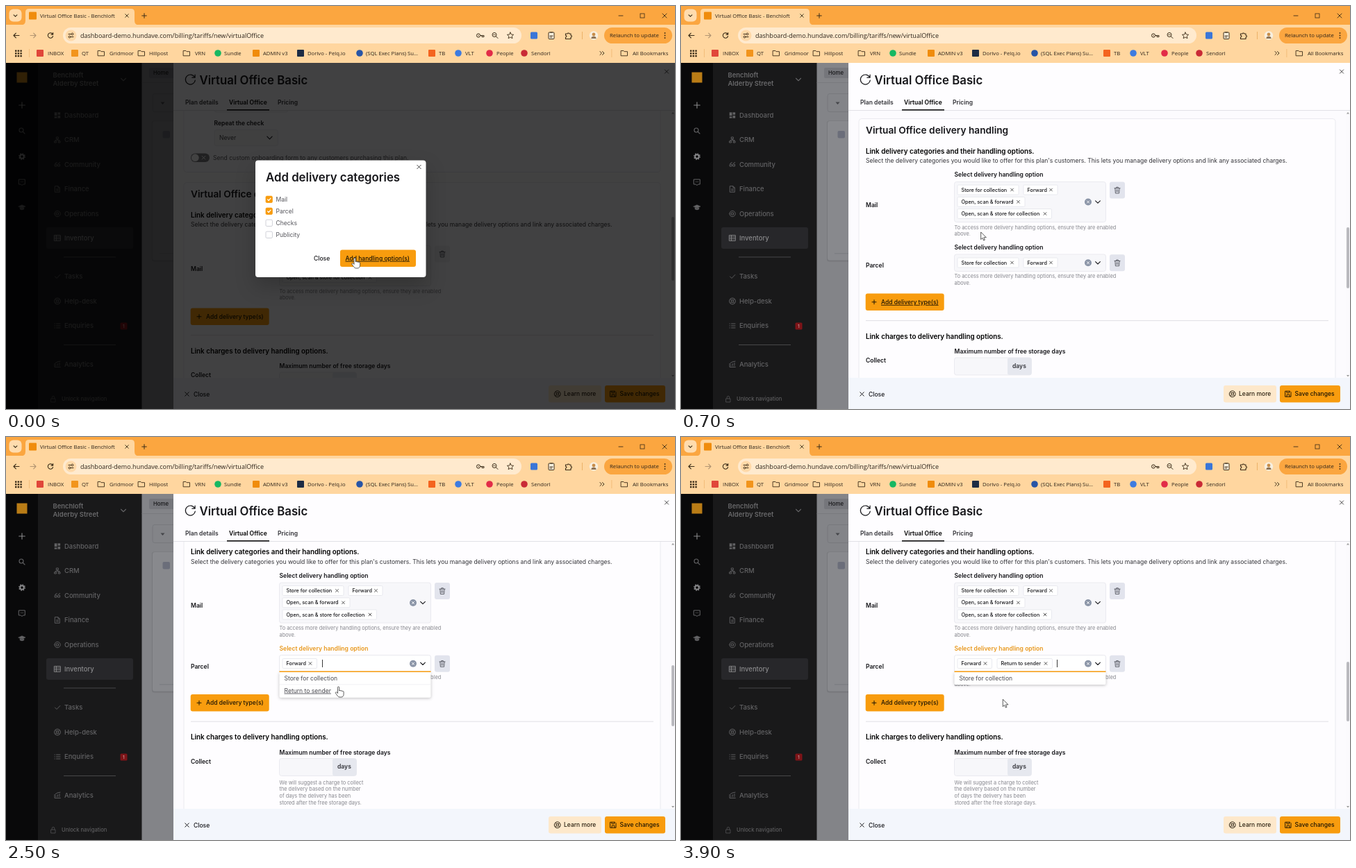
These frames come from a looping animation (963x581 px, 4 s). An HTML page:

```html
<!DOCTYPE html>
<html lang="en">
<head>
<meta charset="utf-8">
<title>Virtual Office Basic</title>
<style>
html, body { margin: 0; width: 100%; height: 100%; overflow: hidden; background: #fff; }
svg { display: block; width: 963px; height: 581px; }
text { font-family: Inter, "Liberation Sans", sans-serif; white-space: pre; }
text.ui { font-family: "Open Sans", "Noto Sans", sans-serif; }
</style>
</head>
<body>
<svg id="stage" viewBox="0 0 963 581"></svg>
<script>
const ORANGE = '#f89c0e', INK = '#17171b', GREY = '#85868c', LINE = '#e6e6ec';

// Drawing helpers: each returns SVG markup; text is placed by its vertical middle.
const text = (x, cy, s, size = 8.57, weight = 400, fill = INK, extra = '') =>
  `<text x="${x}" y="${cy + size * .36}" font-size="${size}" font-weight="${weight}" fill="${fill}" ${extra}>${s.replace(/&/g, '&amp;')}</text>`;
const ui = (x, cy, s, size = 7.7, fill = '#2c241a') => text(x, cy, s, size, 400, fill, 'class="ui"');
const rect = (x, y, w, h, fill, r = 0, stroke = 'none', sw = .8) =>
  `<rect x="${x}" y="${y}" width="${w}" height="${h}" rx="${r}" fill="${fill}" stroke="${stroke}" stroke-width="${sw}"/>`;
const dot = (x, y, r, fill, stroke = 'none', sw = 1) =>
  `<circle cx="${x}" cy="${y}" r="${r}" fill="${fill}" stroke="${stroke}" stroke-width="${sw}"/>`;
const path = (x, y, d, stroke = INK, sw = 1, fill = 'none') =>
  `<path transform="translate(${x} ${y})" d="${d}" fill="${fill}" stroke="${stroke}" stroke-width="${sw}" stroke-linecap="round" stroke-linejoin="round"/>`;
const cross = (x, y, s, c = INK, w = 1) => path(x, y, `M${-s} ${-s}L${s} ${s}M${s} ${-s}L${-s} ${s}`, c, w);
const plus = (x, y, s, c = INK, w = 1) => path(x, y, `M${-s} 0H${s}M0 ${-s}V${s}`, c, w);
const chevron = (x, y, s = 3.5, c = INK, w = 1.1) => path(x, y, `M${-s} ${-s / 2}L0 ${s / 2}L${s} ${-s / 2}`, c, w);
const group = (id, body) => `<g id="${id}">${body}</g>`;
const lens = (x, y, s, c, w = 1) => path(x, y, `M${s} ${s}L${s * .3} ${s * .3}`, c, w) + dot(x - s * .25, y - s * .25, s * .75, 'none', c, w);
const buoy = (x, y, c) => dot(x, y, 4.4, 'none', c) + dot(x, y, 1.8, 'none', c) +
  path(x, y, 'M-3-3L-1.3-1.3M3-3L1.3-1.3M-3 3L-1.3 1.3M3 3L1.3 1.3', c, 1);

function browser() {
  const c = '#3a2c18';
  const folder = x => path(x, 68, 'M-4.5-3.5H-1L0-2.3H4.5V3.8H-4.5Z', c, .9);
  const mark = (x, fill, round) => round ? dot(x, 68, 4.8, fill) : rect(x - 5, 63, 10, 10, fill, 1);
  const marks = [
    [49, '#e0463a', 0, 60, 'INBOX'], [99, '#f2941c', 0, 109, 'QT'], [137, '', 0, 149, 'Gridmoor'],
    [195, '', 0, 206, 'Hillpost'], [260, '', 0, 272, 'VRN'], [305, '#17b862', 1, 314, 'Sundle'],
    [360, '#f08c0c', 0, 370, 'ADMIN v3'], [424, '#1d2c44', 0, 434, 'Dorivo - Pelq.io'],
    [509, '#2855a6', 1, 518, '(SQL Exec Plans) Su...'], [613, '#f4641f', 0, 623, 'TB'],
    [651, '#3d7be0', 1, 661, 'VLT'], [696, '#e22c48', 1, 706, 'People'],
    [746, '#c92a36', 1, 756, 'Sendorl'], [890, '', 0, 902, 'All Bookmarks']
  ];
  let s = rect(0, 0, 963, 28, '#fba640') + rect(0, 27, 963, 55, '#ffd69f');
  s += path(0, 0, 'M22 27.5Q28 27 28 21V9Q28 4 33 4H180Q185 4 185 9V21Q185 27 191 27.5Z', 'none', 0, '#ffd69f');
  s += rect(4.5, 4.5, 18, 18, '#ffdcae', 6) + chevron(13.5, 14, 2.4, c);
  s += rect(33, 8.5, 11, 11, '#f08c0c', 1) + ui(49, 14, 'Virtual Office Basic - Benchloft');
  s += cross(174, 14, 2.3, c, .9) + plus(199, 14, 3.3, c);
  s += path(885, 14, 'M-3 0H3', c, .9) + rect(913, 11, 6, 6, 'none', 0, c) + cross(948, 14, 3, c, .9);
  s += path(15, 42.5, 'M4 0H-4M-.7-3.4L-4 0L-.7 3.4', c, 1.1) + path(39, 42.5, 'M-4 0H4M.7-3.4L4 0L.7 3.4', '#b29572', 1.1);
  s += path(64, 42.5, 'M3.4-1.6A3.7 3.7 0 1 0 3.6 1M3.7-4V-1.4H1', c, 1.1);
  s += rect(82, 31, 660, 23, '#ffeace', 11.5) + dot(93.5, 42.5, 8, '#ffd9a8');
  s += path(93.5, 42.5, 'M-3.5-2H0M-.5 2H3.5', c, 1) + dot(95.5, 40.5, 1.4, 'none', c) + dot(91.5, 44.5, 1.4, 'none', c);
  s += ui(107, 42.5, 'dashboard-demo.hundave.com/billing/tariffs/new/virtualOffice', 9.02);
  s += dot(680, 42.5, 2.6, 'none', c) + dot(680, 42.5, .7, c) + path(685, 42.5, 'M-2 0H3V2H0V0', c, 1);
  s += lens(704, 42.5, 4, c) + path(704, 42.5, 'M-2.6-1H.5', c, .7);
  s += path(726, 42.5, 'M0-4.5L1.4-1.5L4.6-1.2L2.2 1L2.9 4.2L0 2.5L-2.9 4.2L-2.2 1L-4.6-1.2L-1.4-1.5Z', c, .9);
  s += rect(755, 37.5, 10, 10, '#3a76d8', 1.5);
  s += rect(781, 38, 8, 9.5, '#fff3e0', 1, c, 1) + path(785, 43, 'M-2 0H2M-2 2H1M-1.5-5H1.5', c, 1);
  s += path(809.5, 43, 'M-4-3H-1.4A1.5 1.5 0 0 1 1.4-3H3.5V-.8A1.4 1.4 0 0 1 3.5 2V4.5H-4V2A1.4 1.4 0 0 0-4-.8Z', c, 1.1);
  s += rect(829, 37, .8, 11, '#e8a95c') + dot(846, 42.5, 6.2, '#f7efe0') + dot(846, 41, 2.4, '#c98e4a') + path(846, 47, 'M-3.6 0A3.6 3.2 0 0 1 3.6 0Z', 'none', 0, '#8d7355');
  s += rect(861, 31, 98, 23, '#fba640', 11.5) + ui(869, 42.5, 'Relaunch to update', 7.8);
  for (const y of [39, 42.5, 46]) s += dot(948.5, y, .9, c);
  for (let i = 0; i < 9; i++) s += rect(13 + i % 3 * 3.7, 63.5 + Math.floor(i / 3) * 3.7, 2.4, 2.4, c);
  s += rect(33, 62, .8, 12, '#efb671') + rect(871.5, 62, .8, 12, '#efb671');
  s += path(858, 68, 'M-3-2.5L-.5 0L-3 2.5M.5-2.5L3 0L.5 2.5', c, 1);
  for (const [x, fill, round, tx, label] of marks) s += (fill ? mark(x, fill, round) : folder(x)) + ui(tx, 68, label);
  return s;
}

function sidebar() {
  const c = '#636365', hi = '#8a8a8c';
  const icons = {
    Dashboard: [157.5, 'M-4-4H-.7V.5H-4ZM.7-4H4V-1H.7ZM.7.7H4V4H.7ZM-4 2H-.7V4H-4Z', 1],
    CRM: [193, 'M-1.3-4H1.3V-1.5H-1.3ZM-4 1.8H-1.6V4H-4ZM1.6 1.8H4V4H1.6ZM0-1.5V.3M-2.8 1.8V.3H2.8V1.8'],
    Community: [228.5, 'M-.8-3Q-4-2.5-4 2.5H-1V-.3H-2.6M3.6-3Q.5-2.5 .5 2.5H3.5V-.3H2'],
    Finance: [264, 'M-3.3-4.3H1L3.3-2V4.3H-3.3ZM1-4V-2H3M-1.5 0H1.5M-1.5 2H1.5'],
    Operations: [299.5, 'M-4.2 0A4.2 4.2 0 1 0 4.2 0A4.2 4.2 0 1 0-4.2 0M-1.5-1.5H1.5V1.5H-1.5Z'],
    Inventory: [334.5, 'M-4.3-4H4.3V4H-4.3ZM-4.3-1.5H4.3M-4.3 1.2H4.3M-1.6-4V4'],
    Tasks: [390, 'M-3.5 0L-1 2.5L3.8-2.5'],
    'Help-desk': [425.5, ''],
    Enquiries: [461, 'M-1.5-3H4M-1.5 0H4M-1.5 3H4M-4-3H-3.6M-4 0H-3.6M-4 3H-3.6'],
    Analytics: [516.5, 'M-4-1V4H4.3M-2 2V.5M.5 2V-.7M3 2V-2M-3-1.5L0-3.5L4-4.3']
  };
  let s = rect(0, 82, 46, 499, '#09090a') + rect(46, 82, 150, 499, '#19191a');
  s += rect(15.5, 95.5, 15, 15, '#b97c16');
  s += plus(23, 143, 4.3, hi, 1.1) + lens(23, 180, 4, c, 1.1);
  s += dot(23, 217, 2.8, 'none', hi, 1.9) + dot(23, 217, 4.3, 'none', hi, 1.2).replace('/>', ' stroke-dasharray="1.7 1.68"/>');
  s += path(23, 254, 'M-4.3-4H4.3V3H1.5L0 4.7L-1.5 3H-4.3ZM-1.5-.5H-1M1-.5H1.5', c, 1);
  s += path(23, 290, 'M-5-1L0-3.2L5-1L0 1.2ZM-2.8.8V3Q0 4.6 2.8 3V.8L0 2Z', c, .6, c);
  s += text(67.5, 100, 'Benchloft', 9.45, 600, '#68686a') + text(67.5, 112, 'Alderby Street', 9.45, 600, '#68686a') + chevron(169, 106, 3.5, c);
  s += rect(58, 319, 125, 31, '#27272a', 3);
  for (const [name, [y, d, solid]] of Object.entries(icons)) {
    const col = name === 'Inventory' ? hi : c;
    s += d ? path(74, y, d, col, solid ? .3 : .9, solid ? col : 'none') : buoy(74, y, col);
    s += text(84, y, name, 9.45, 500, col);
  }
  s += rect(83, 361.5, 75, .9, '#4d4d4f') + rect(83, 488, 75, .9, '#4d4d4f');
  s += rect(164.5, 456.5, 10, 10, '#7d1418', 1.5) + text(168, 461.5, '1', 6.5, 500, '#c9a0a0');
  s += path(68, 567, 'M-3-1H3V4H-3ZM-1.8-1V-2.8A1.8 1.8 0 0 1 1.8-2.8V-1', '#4c4c4e', .9) + text(80, 566, 'Unlock navigation', 7.65, 500, '#5c5c5e');
  s += rect(195.5, 82, 46, 499, '#838488') + rect(195.5, 110, 46, .8, '#77787c');
  s += rect(206, 89, 40, 15, '#75767b', 2) + text(212, 96.5, 'Home', 7.8, 500, '#151517');
  s += rect(211, 126.5, 40, 26, '#838488', 3, '#74757a') + path(225.5, 140, 'M-3-1.5H3L0 2Z', 'none', 0, '#45464a');
  s += rect(210, 165.5, 40, 203, '#77787c', 3) + rect(211, 166, 40, 200.5, '#88898d', 3) + rect(225.5, 180, 10.5, 10.5, '#6b6e7a', 2) + rect(221, 356.5, 20, .8, '#75767a');
  return s;
}

const chip = (x, cy, w, label) => rect(x, cy - 7, w, 14, '#fff', 1.5, '#e4e5eb') +
  text(x + 5.5, cy, label, 7.25, 500) + cross(x + w - 9.5, cy, 1.9, '#444', .9);
const tail = cy => dot(586, cy, 5, '#8b95a7') + cross(586, cy, 1.6, '#fff', .9) + chevron(600, cy, 3.4);
const trash = (cy, id) => `<rect id="${id}" x="617" y="${cy - 12}" width="22" height="24" rx="3" fill="#e2e4ed"/>` +
  path(628, cy, 'M-4-2.8H4M-1.3-2.8V-4.3H1.3V-2.8M-3.2-2.8L-2.6 4.5H2.6L3.2-2.8M-1-.8V2.5M1-.8V2.5', '#4d5058', .85);
const hint = (cy, lines, step = 9.8) => lines.map((l, i) => text(393.5, cy + i * step, l, 7.36, 400, GREY)).join('');
const access = ['To access more delivery handling options, ensure they are enabled', 'above.'];
const button = (x, y, w, fill) => rect(x, y, w, 24.5, fill, 3);
const caret = x => rect(x, 456.5, .9, 11, '#222');

function content() {
  let s = rect(241, 82, 722, 499, '#fcfbfe');
  let top = rect(256, 100, 686, 139.5, '#fefdff', 4, LINE) + rect(300, 130, 106, 23, '#f7f7fa', 3, LINE);
  top += text(299.5, 168.5, 'Repeat the check', 8.57, 600) + rect(300, 178.5, 91.5, 23, '#f7f7fa', 3, LINE) + text(307, 190, 'Never', 8.57, 400, '#444') + chevron(379.5, 190, 3.6);
  top += rect(266, 212.5, 27, 12.5, '#7b7b80', 6.2) + dot(272.3, 218.7, 5.4, '#fff') + cross(284.5, 218.7, 2.4, '#fff', 1);
  top += text(298, 219, 'Send custom onboarding form to any customers purchasing this plan.', 8.57, 400, '#55555b');
  top += rect(256, 254.5, 686, 600, '#fefdff', 4, LINE) + text(266, 271.5, 'Virtual Office delivery handling', 13.7, 600);
  top += text(266, 301, 'Link delivery categories and their handling options.', 9.82, 600, '#000');
  top += text(266, 315, "Select the delivery categories you would like to offer for this plan's customers. This lets you manage delivery options and link any associated charges.", 8.57, 400, '#333338');
  top += text(393.5, 335, 'Select delivery handling option', 8.57, 600) + rect(393.5, 345.5, 218, 58, '#f7f7fa', 3, LINE);
  top += chip(398, 357, 88, 'Store for collection') + chip(493, 357, 49, 'Forward') + chip(398, 374.3, 97, 'Open, scan & forward') + chip(398, 391.5, 135.5, 'Open, scan & store for collection');
  top += tail(374.5) + trash(357.5, 'bin') + hint(411, access) + text(266, 378.5, 'Mail', 8.57, 600);

  let parcel = text(393.5, 440.3, 'Select delivery handling option', 8.57, 600, INK, 'id="label"') + text(266, 466, 'Parcel', 8.57, 600);
  parcel += rect(393.5, 450, 218, 24.5, '#f7f7fa', 3, LINE) + hint(481.8, access) + trash(462.3, 'bin2');
  parcel += group('idle', chip(398, 462, 88, 'Store for collection') + chip(493, 462, 49, 'Forward'));

  let lower = button(265.7, 506.5, 113, ORANGE) + plus(278, 518.8, 3, '#1c1404', 1) + text(288, 518.8, 'Add delivery type(s)', 8.5, 500, '#1c1404', 'id="add"');
  lower += rect(266, 545.2, 666, .9, '#dcdce2') + text(266, 568, 'Link charges to delivery handling options.', 9.82, 600, '#000');
  lower += text(266, 603.3, 'Collect', 8.57, 600) + text(393.5, 590, 'Maximum number of free storage days', 8.57, 600);
  lower += rect(393.5, 599, 111, 25, '#f7f7fa', 3, LINE) + rect(470, 599, 34.5, 25, '#e6e8ef', 3) + text(477, 610.7, 'days', 8.57, 600, '#33343a');
  lower += hint(633.5, ['We will suggest a charge to collect', 'the delivery based on the number', 'of days the delivery has been', 'stored after the free storage days.']);

  const field = rect(393.5, 450, 218, 24.5, '#fff', 3, LINE) + chip(398, 462, 49.5, 'Forward');
  const menu = h => `<rect x="393.5" y="474.5" width="218" height="${h}" rx="2" fill="#fff" style="filter:drop-shadow(0 1.5px 2px rgba(0,0,0,.25))"/>` +
    rect(393.5, 473, 218, 1.5, ORANGE) + text(400.5, 483.5, 'Store for collection', 8.57, 400, '#4a4a50');
  const open = field + group('two', menu(36.8) + rect(394, 492, 217, .7, '#ececf0') + caret(455) + text(400.5, 501, 'Return to sender', 8.57, 400, '#4a4a50', 'text-decoration="underline"')) +
    group('one', menu(18) + chip(455, 462, 79.5, 'Return to sender') + caret(541));

  s += group('scroll', top + group('lower', lower) + group('parcel', parcel + group('open', open) + tail(462.3)));
  return s;
}

function frame() {
  let s = rect(241, 82, 722, 68.5, '#fefdff') + rect(241, 150, 722, .9, '#dedee4') + cross(951, 94.5, 2.6, '#333', .9);
  s += path(265.3, 106, 'M6.3-3.2A7 7 0 1 0 7 1M6.8-7V-2.8H2.6', INK, 1.2) + text(278.5, 106.5, 'Virtual Office Basic', 16.8, 600);
  s += text(258, 138.5, 'Plan details', 8.57, 600, '#333338') + text(321, 138.5, 'Virtual Office', 8.57, 600, '#000') + text(391, 138.5, 'Pricing', 8.57, 600, '#333338') + rect(318, 149, 61, 1.6, '#111');
  s += rect(957, 151, 6, 385, '#fbfafd') + path(960, 154.5, 'M-2 1L0-1.5L2 1Z', 'none', 0, '#999') + path(960, 533, 'M-2-1L0 1.5L2-1Z', 'none', 0, '#999');
  s += '<rect id="thumb" x="958" width="4" rx="2" fill="#b9b9be"/>';
  s += rect(241, 536, 722, 45, '#f3f6fc') + cross(260.5, 559.5, 2.7, INK, 1) + text(270, 559.5, 'Close', 8.57, 500);
  s += button(781, 547, 76, '#fde8cb') + buoy(793.7, 559.3, '#2a2010') + text(803, 559.3, 'Learn more', 8.5, 500, '#2a2010');
  s += button(862, 547, 87, ORANGE) + path(874, 559.3, 'M-4-4H2.5L4-2.5V4H-4ZM-2-4V-1.5H1.5V-4M-2 4V1H2V4', '#1c1404', .9) + text(883.5, 559.3, 'Save changes', 8.5, 500, '#1c1404');
  return s;
}

function modal() {
  let s = rect(0, 82, 963, 499, 'rgba(0,0,0,.74)');
  s += '<rect x="359" y="222.5" width="245.5" height="168.5" rx="4" fill="#fff" style="filter:drop-shadow(0 13px 14px rgba(0,0,0,.2))"/>';
  s += text(374, 247, 'Add delivery categories', 16.8, 600) + cross(594.5, 232, 2.7, '#333', .9);
  ['Mail', 'Parcel', 'Checks', 'Publicity'].forEach((name, i) => {
    const y = 278.8 + i * 17, on = i < 2;
    s += rect(374, y - 4.7, 9.4, 9.4, on ? ORANGE : '#fff', 1.5, on ? ORANGE : '#c4c6ce');
    if (on) s += path(378.7, y, 'M-2.2 0L-.6 1.7L2.3-1.6', '#fff', 1.2);
    s += text(388.5, y, name, 8.57, 400, '#55555b');
  });
  s += text(443, 364, 'Close', 8.57, 500) + button(481, 351.5, 109, ORANGE) + text(488.5, 363.7, 'Add handling option(s)', 8.5, 500, '#1c1404', 'text-decoration="underline"');
  return s;
}

const cursor = group('cursor',
  group('arrow', path(0, 0, 'M0 0V10.2L2.4 8L4 11.6L5.7 10.9L4.2 7.4H7.3Z', '#333', .8, '#fff')) +
  group('hand', path(0, 0, 'M-1.2 1.2a1.2 1.2 0 0 1 2.4 0V6c.3-1 2.2-.9 2.3.3.4-.9 2.1-.7 2.2.4.6-.7 1.9-.3 1.9.8v3.2c0 2.3-1.2 4.3-3.4 4.3H1.5C-.6 15-1.6 12.5-4 9.4c-.8-1.2.8-2.2 1.7-1.3l1.1 1.1z', '#333', .8, '#fff')));

// The scrolled content runs under the drawer frame and the browser bars.
document.getElementById('stage').innerHTML = sidebar() + content() + frame() + browser() + group('modal', modal()) + cursor;

const $ = id => document.getElementById(id);
const show = (id, on) => $(id).setAttribute('display', on ? 'inline' : 'none');
const move = (id, x, y) => $(id).setAttribute('transform', `translate(${x} ${y})`);

// Linear interpolation through [time, ...values] rows.
function along(keys, t) {
  const i = keys.findIndex(k => k[0] > t);
  if (i < 0) return keys[keys.length - 1].slice(1);
  if (i === 0) return keys[0].slice(1);
  const a = keys[i - 1], b = keys[i], p = (t - a[0]) / (b[0] - a[0]);
  return a.slice(1).map((v, j) => v + (b[j + 1] - v) * p);
}

const LOOP = 4000, STEP = 100, REMOVE = 2100, PICK = 3600;
const scrollKeys = [[300, 0], [400, 8], [500, 33], [600, 62], [700, 92], [800, 118], [900, 131], [1000, 135.5]];
const pointerKeys = [[0, 502, 363], [100, 483, 357], [300, 443, 336], [500, 423, 325], [800, 436, 327], [1200, 461.5, 328],
  [1800, 475.5, 325], [2100, 475.5, 325], [2300, 477, 346], [2500, 478.5, 360], [2600, 478.5, 360], [3400, 469, 366],
  [3600, 465, 370], [3800, 463.3, 374], [3900, 463.3, 378.5]];

function draw() {
  const t = Math.floor(performance.now() % LOOP / STEP) * STEP;
  const dialog = t < 100, open = t >= REMOVE, picked = t >= PICK;
  const [y] = along(scrollKeys, t), [px, py] = along(pointerKeys, t);
  move('scroll', 0, -y);
  move('lower', 0, dialog ? -71 : 0);
  show('modal', dialog);
  show('parcel', !dialog);
  show('idle', !open);
  show('open', open);
  show('two', !picked);
  show('one', picked);
  $('label').setAttribute('fill', open ? '#e8981d' : INK);
  $('add').setAttribute('text-decoration', dialog || open ? 'none' : 'underline');
  $('bin').setAttribute('fill', t < 200 ? '#f2f2f6' : '#e2e4ed');
  const [ty, th] = dialog ? [304, 92] : picked ? [324, 86] : [298 + y * .229, 88];
  $('thumb').setAttribute('y', ty);
  $('thumb').setAttribute('height', th);
  const hand = dialog || (t >= 2400 && !picked);
  show('hand', hand);
  show('arrow', !hand);
  move('cursor', px, py);
  requestAnimationFrame(draw);
}
draw();
</script>
</body>
</html>
```
